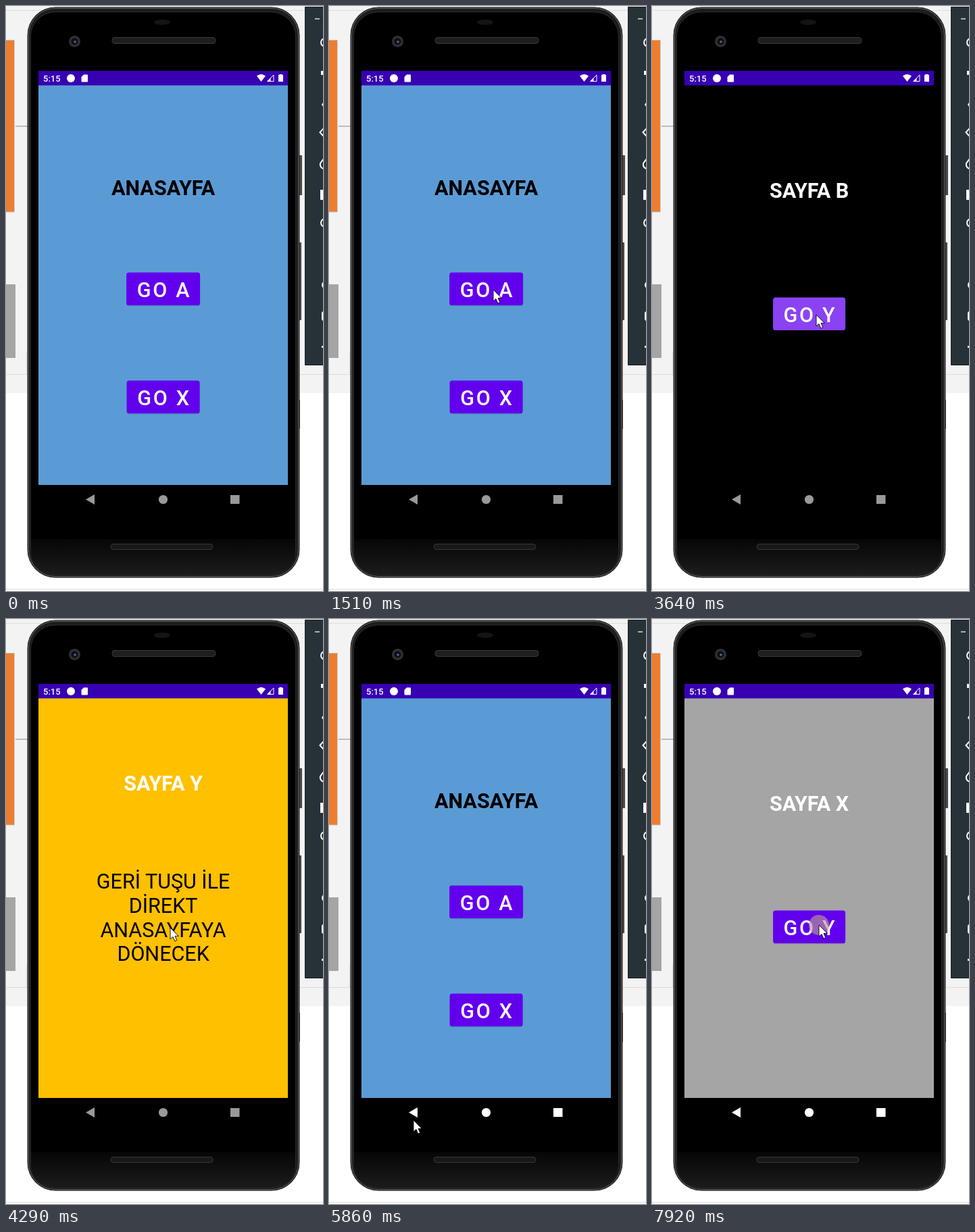
An HTML page for the animation above (7990 ms loop, 469 by 866 pixels).

```html
<!DOCTYPE html>
<html lang="tr">
<head>
<meta charset="utf-8">
<title>Sayfa geçişleri</title>
<style>
  html, body { margin: 0; width: 100%; height: 100%; overflow: hidden; background: #fff; }
  svg { display: block; width: 469px; height: 866px; }
  text { font: 30.5px Roboto, sans-serif; text-anchor: middle; }
  .title { font-weight: 700; }
  .label { font-weight: 500; letter-spacing: 2.72px; fill: #fff; }
  .clock { font-size: 13px; font-weight: 500; text-anchor: start; fill: #fff; }
</style>
</head>
<body>
<svg viewBox="0 0 469 866">
  <defs>
    <linearGradient id="chin" x2="0" y2="1">
      <stop offset="0" stop-color="#060606"/>
      <stop offset="1" stop-color="#1b1b1b"/>
    </linearGradient>
    <clipPath id="screen"><path d="M48 117H417V709H48Z"/></clipPath>
  </defs>

  <!-- desktop behind the phone -->
  <path fill="#f3f3f3" d="M0 0H469V573H0Z"/>
  <path fill="none" stroke="#dcdcdc" d="M0 6.5H469M0 545.5H469M0 863.5H469M30.5 512V545"/>
  <path fill="none" stroke="#bdbdbd" stroke-width="2" d="M14 178H33"/>
  <path fill="#ed7d31" stroke="#c9c9c9" d="M-1 50.5H12.5V305H-1Z"/>
  <path fill="#a5a5a5" d="M0 412H14V521H0Z"/>

  <!-- emulator toolbar -->
  <path fill="#263238" stroke="#171d20" d="M442.5 1.5H470V531.5H442.5Z"/>
  <path fill="#aab2b6" d="M457 18H464V20H457Z"/>
  <g fill="none" stroke="#fff" stroke-width="2">
    <circle cx="472" cy="54" r="6"/>
    <path d="M470 181L464.5 187L470 193"/>
    <path d="M470 226L465 233Q464 239 470 241"/>
    <circle cx="472" cy="321" r="6"/>
    <circle cx="473" cy="413" r="5"/>
    <rect x="468" y="453" width="10" height="12" rx="2"/>
  </g>
  <path fill="#fff" d="M466 96H469V102H466ZM467 146L469 143V149ZM465 272H469V287H465ZM467 503H469V506H467Z"/>

  <!-- phone -->
  <path fill="#4a4a4a" d="M433 221H438V280H433ZM433 350H437V465H433ZM433 583H435V626H433Z"/>
  <rect x="32" y="2" width="402" height="844" rx="41" fill="#1c1c1c" stroke="#2e2e2e"/>
  <rect x="33.5" y="3.5" width="399" height="841" rx="39.5" fill="none" stroke="#626262"/>
  <rect x="36.5" y="9" width="392" height="832" rx="36" fill="#000" stroke="#2b2b2b"/>
  <path fill="url(#chin)" d="M37 789H428V805Q428 840 392 840H73Q37 840 37 805Z"/>
  <ellipse cx="231" cy="24" rx="12" ry="4" fill="#141414"/>
  <rect x="157" y="46.5" width="153" height="9" rx="4" fill="#1e1e1e" stroke="#3a3a3a"/>
  <rect x="155" y="796.5" width="151" height="8" rx="4" fill="#181818" stroke="#383838"/>
  <circle cx="101.5" cy="52.5" r="8.5" fill="#303030"/>
  <circle cx="101.5" cy="52.5" r="5" fill="#0d0f18"/>
  <circle cx="102" cy="53" r="1.8" fill="#53659a"/>

  <g id="pages" clip-path="url(#screen)"></g>

  <!-- status bar -->
  <path fill="#3700b3" d="M48 96H417V117.5H48Z"/>
  <text class="clock" x="55" y="111.5">5:15</text>
  <g fill="#fff">
    <circle cx="96" cy="107" r="6"/>
    <path d="M115 101.500H120Q121 101.500 121 102.500V111.500Q121 112.500 120 112.500H112.500Q111.500 112.500 111.500 111.500V105Z"/>
    <path d="M371 103.500Q377.500 98.500 384 103.500L377.500 112Z"/>
    <path d="M391.500 106V112H386Z"/>
    <path d="M404.500 102V101H408.500V102H410V112H403V102Z"/>
  </g>
  <path fill="none" stroke="#fff" d="M387 111.500H396V102Z"/>

  <g id="nav">
    <path d="M118 730.500L131 723V738Z"/>
    <circle cx="232.500" cy="730.500" r="6.600"/>
    <path d="M332 724H345.500V737H332Z"/>
  </g>

  <circle id="touch" r="15" fill="#b89a94" opacity=".65"/>
  <path id="cursor" fill="#fff" stroke="#000" stroke-width=".9" stroke-linejoin="round"
    d="M0 0V17L4 13.500L6.800 20L9.800 18.700L7.100 12.400H12.300Z"/>
</svg>

<script>
const LOOP = 7990, FADE = 150, PRESS = 130;
const ENTER = 300, BACK = 5660, LAST_CLICK = 7850;
const MID = 232.6;
const $ = id => document.getElementById(id);

// Each label is centred without its trailing letter space.
const button = (name, y, w = 108) => {
  const box = `x="${MID - w / 2}" width="${w}" height="48.5" rx="3.6"`;
  return `<rect ${box} y="${y + 1.2}" opacity=".16"/>
    <rect ${box} y="${y}" fill="#6200ee"/>
    <rect ${box} y="${y}" fill="#fff" class="glow" opacity="0"/>
    <text class="label" x="${MID + 1.36}" y="${y + 36.2}">${name}</text>`;
};
const title = (name, y, color) =>
  `<text class="title" x="${MID}" y="${y}" fill="${color}">${name}</text>`;
const note = ['GERİ TUŞU İLE', 'DİREKT', 'ANASAYFAYA', 'DÖNECEK']
  .map((line, i) => `<text x="${MID}" y="${399 + i * 35.8}">${line}</text>`).join('');

const home = {
  color: '#5b9bd5',
  body: title('ANASAYFA', 280, '#000') + button('GO A', 394.5, 109) + button('GO X', 554.5)
};

// Every page opens over the one before it, at its click.
const pages = [
  { ...home, click: -LOOP },
  { click: 1770, color: '#ed7d31', body: title('SAYFA A', 284, '#000') + button('GO B', 431.5) },
  { click: 2690, color: '#000', body: title('SAYFA B', 284, '#fff') + button('GO Y', 431.5, 107) },
  { click: 4090, color: '#ffc000', body: title('SAYFA Y', 254, '#fff') + note },
  { ...home, click: BACK },
  { click: 6900, color: '#a5a5a5', body: title('SAYFA X', 284, '#fff') + button('GO Y', 431.5, 107) }
];
const clicks = [...pages.map(p => p.click), LAST_CLICK];

// Cursor glides
const glides = [
  { from: ENTER, to: 690, x: 262, y: 434 },
  { from: 1360, to: 1510, x: 243, y: 420 },
  { from: 2560, to: 2630, x: 243, y: 457 },
  { from: 4300, to: 4900, x: 125, y: 742 },
  { from: 5900, to: 6530, x: 233, y: 585 },
  { from: 7260, to: 7530, x: 247, y: 453 }
];

$('pages').innerHTML = pages.map(p =>
  `<g><path fill="${p.color}" d="M48 117H417V709H48Z"/>${p.body}</g>`).join('');
const layers = [...$('pages').children];
const glow = layers[2].querySelector('.glow');

const ramp = (t, from, span) => Math.min(1, Math.max(0, (t - from) / span));
const ease = k => k * k * (3 - 2 * k);

function draw(t) {
  layers.forEach((layer, i) => {
    const k = ramp(t, pages[i].click + 50, FADE);
    layer.setAttribute('opacity', k);
    layer.setAttribute('transform', `translate(0 ${24 * (1 - k) ** 2})`);
  });
  glow.setAttribute('opacity', 0.26 * ramp(t, 3400, 240));
  $('nav').setAttribute('fill', t < BACK ? '#999' : '#fff');

  let x = 455, y = 570;
  for (const g of glides) {
    const k = ease(ramp(t, g.from, g.to - g.from));
    x += (g.x - x) * k;
    y += (g.y - y) * k;
  }
  const pressed = clicks.some(c => t >= c && t < c + PRESS);
  for (const [id, shown] of [['cursor', t >= ENTER], ['touch', pressed]]) {
    $(id).setAttribute('transform', `translate(${x} ${y})`);
    $(id).setAttribute('visibility', shown ? 'visible' : 'hidden');
  }
}

const start = performance.now();
function tick() {
  draw((performance.now() - start) % LOOP);
  requestAnimationFrame(tick);
}
tick();
</script>
</body>
</html>
```
